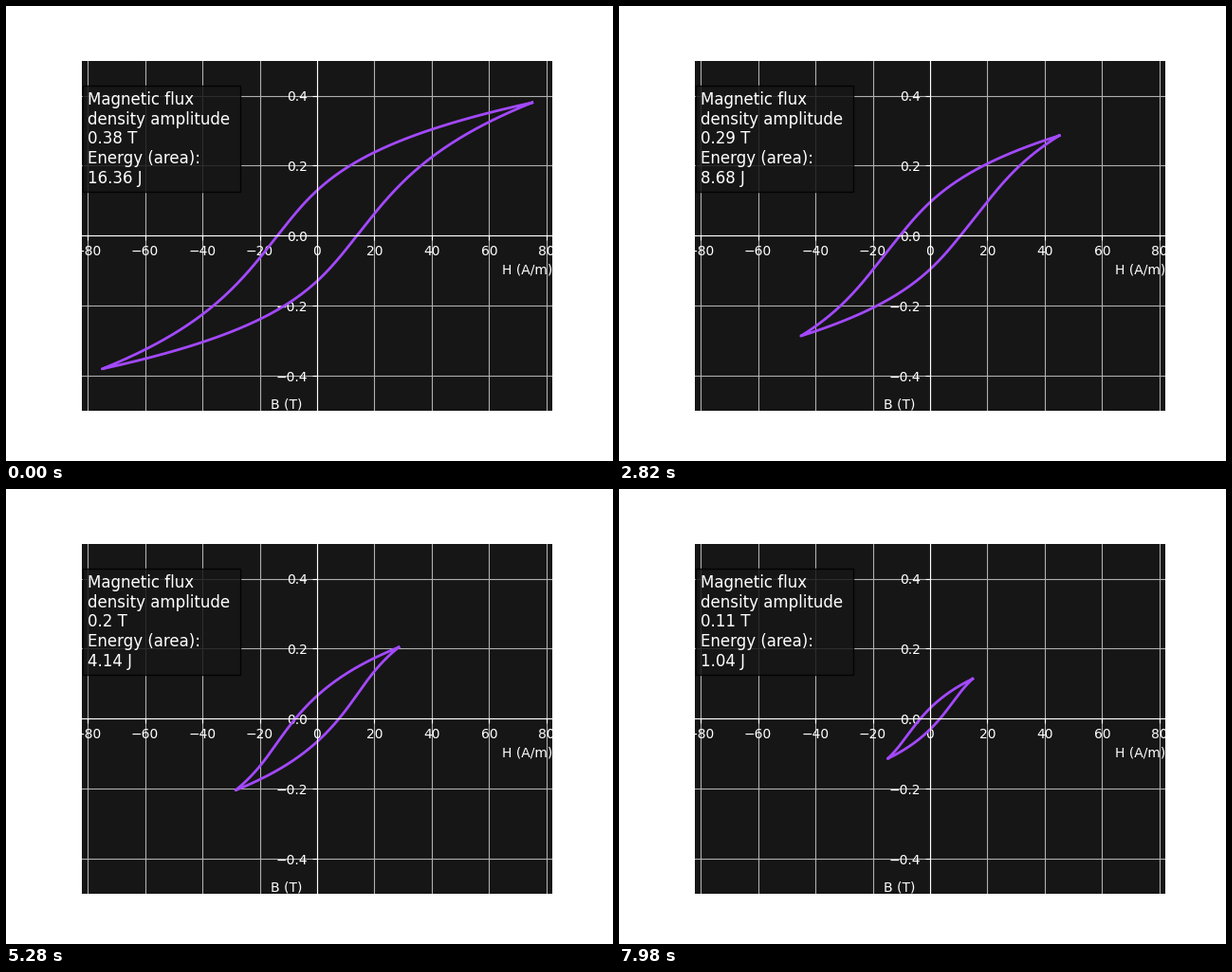
Animation of 640 by 480 pixels, one loop 8 s. Source, as a matplotlib script:

```python
import numpy as np
import matplotlib.pyplot as plt
from matplotlib.animation import FuncAnimation

FRAMES, INTERVAL = 320, 25        # one loop of 8 s
STEP_MS = 30                      # the loop shrinks once per step
B_START, B_STEP = 0.38, 0.001
DARK = "#161616"

# Loss per cycle at a few flux amplitudes, joined by power laws
AMPS = [0.114, 0.17, 0.204, 0.256, 0.315, 0.35, 0.38]
LOSS = [1.04, 2.76, 4.14, 6.8, 10.73, 13.69, 16.36]


def energy(amp):
    return np.exp(np.interp(np.log(amp), np.log(AMPS), np.log(LOSS)))


def hysteresis(amp):
    """Closed H-B loop whose area equals the energy at this amplitude."""
    theta = np.linspace(0, 2 * np.pi, 361) + np.pi / 2
    b = np.sin(theta)
    rising = np.where(np.cos(theta) >= 0, 1, -1)
    tip = 126.5 + 235 * amp**2 + 1765 * amp**4
    core = 96 + 30 * (B_START - amp)
    middle = amp * b * (core + (tip - core) * np.abs(b)**2.3)
    power = max(2, 3.5 - 10 * (B_START - amp))
    coercive = energy(amp) * (power + 1) / (4 * amp * power)
    return middle + rising * coercive * (1 - np.abs(b)**power), amp * b


fig, ax = plt.subplots(figsize=(6.4, 4.8), dpi=100)
fig.patch.set_facecolor("white")
ax.set_facecolor(DARK)
ax.set_xlim(-82, 82)
ax.set_ylim(-0.5, 0.5)
ax.grid(True)
ax.set_xticks(np.arange(-80, 81, 20))
ax.set_yticks([-0.4, -0.2, 0, 0.2, 0.4])
ax.tick_params(color="white", labelcolor="white")
for side in ("left", "bottom"):
    ax.spines[side].set_position("zero")
    ax.spines[side].set_color("white")
for side in ("right", "top"):
    ax.spines[side].set_visible(False)
ax.set_xlabel("H (A/m)", loc="right", color="white")
ax.set_ylabel("B (T)", loc="bottom", rotation=0, color="white")

curve, = ax.plot([], [], color="#a349ff", lw=2)
info = ax.text(-80, 0.15, "", color="white", fontsize=12,
               bbox=dict(facecolor=DARK, edgecolor="black", alpha=0.85))


def update(i):
    step = (i * INTERVAL + 20) // STEP_MS
    amp = B_START - B_STEP * step
    curve.set_data(*hysteresis(amp))
    shown = round(amp - 1e-9, 2)  # halves round down
    info.set_text("Magnetic flux \ndensity amplitude \n"
                  f"{shown} T\nEnergy (area): \n"
                  f"{round(float(energy(amp)), 2)} J")
    return curve, info


anim = FuncAnimation(fig, update, frames=FRAMES, interval=INTERVAL,
                     repeat=True, repeat_delay=0)
plt.show()
```
